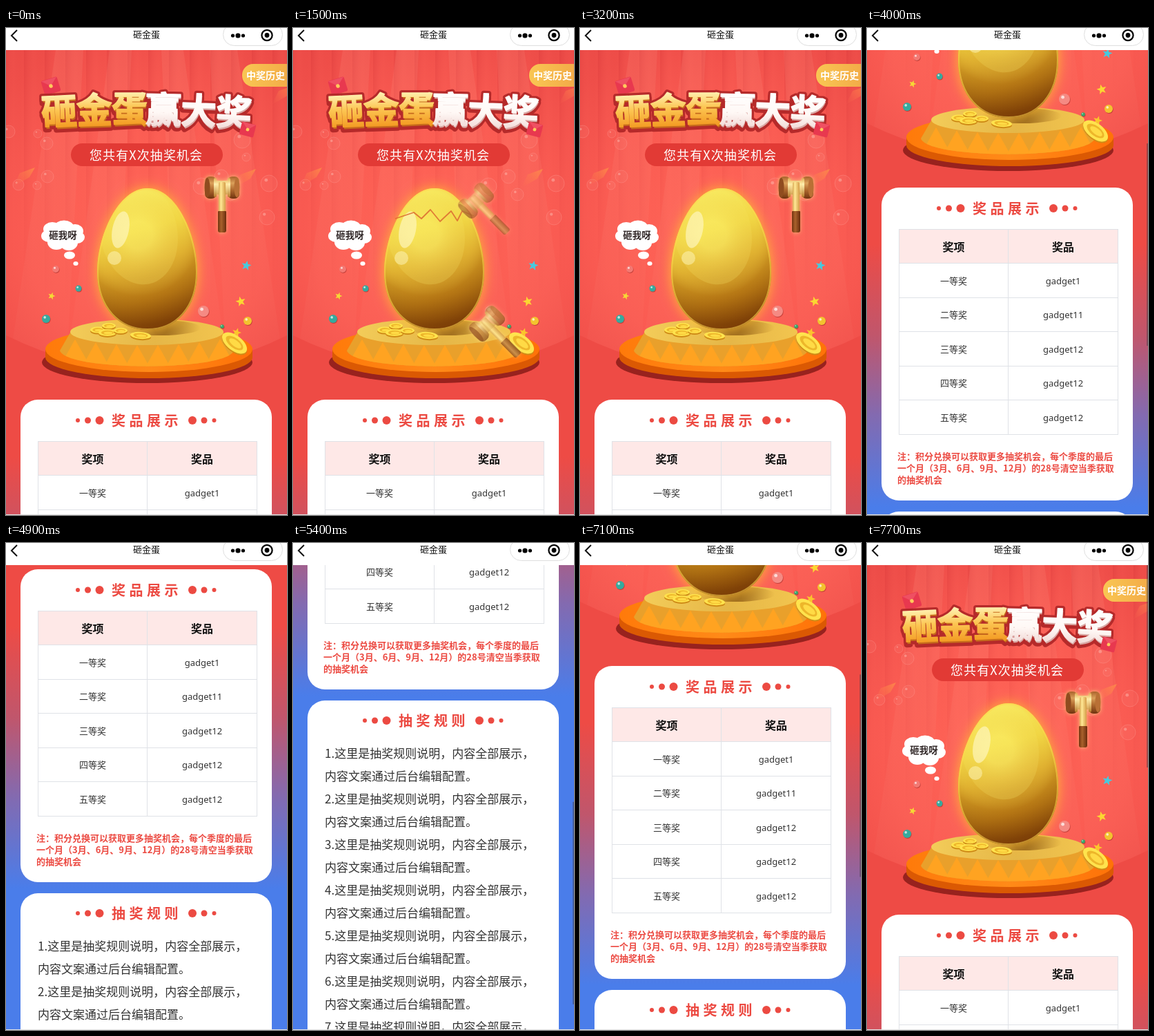
Animation of 407 by 705 pixels, one loop 8000 ms. Source, as an HTML page with a canvas:

```html
<!DOCTYPE html>
<html lang="zh">
<head>
<meta charset="utf-8">
<style>
html, body { margin: 0; width: 100%; height: 100%; overflow: hidden; background: #fff; }
canvas { display: block; width: 407px; height: 705px; }
</style>
</head>
<body>
<canvas id="stage"></canvas>
<script>
const W = 407, H = 705, LOOP = 8000, TOP = 32, TAU = Math.PI * 2;
const FONT = '"Noto Sans CJK SC", "Noto Sans CJK", sans-serif';
const RED = '#ec4a42';
const canvas = document.getElementById('stage');
const ctx = canvas.getContext('2d');
const dpr = window.devicePixelRatio || 1;
canvas.width = W * dpr;
canvas.height = H * dpr;

const clamp = v => Math.max(0, Math.min(1, v));
const ramp = (t, a, b) => clamp((t - a) / (b - a));
const glide = p => 0.45 * p + 0.55 * Math.sin(p * Math.PI / 2);

function gradient(x0, y0, x1, y1, ...stops) {
  const g = ctx.createLinearGradient(x0, y0, x1, y1);
  stops.forEach(([at, color]) => g.addColorStop(at, color));
  return g;
}
function radial(x, y, r0, r1, ...stops) {
  const g = ctx.createRadialGradient(x, y, r0, x, y, r1);
  stops.forEach(([at, color]) => g.addColorStop(at, color));
  return g;
}
function oval(x, y, rx, ry, fill, angle = 0) {
  ctx.beginPath();
  ctx.ellipse(x, y, rx, ry, angle, 0, TAU);
  ctx.fillStyle = fill;
  ctx.fill();
}
const dot = (x, y, r, fill) => oval(x, y, r, r, fill);
function round(x, y, w, h, r, fill) {
  ctx.beginPath();
  ctx.roundRect(x, y, w, h, r);
  ctx.fillStyle = fill;
  ctx.fill();
}
function poly(points, fill) {
  ctx.beginPath();
  points.forEach(([x, y]) => ctx.lineTo(x, y));
  ctx.closePath();
  ctx.fillStyle = fill;
  ctx.fill();
}
// y is the visual middle of the line
function text(str, x, y, size, color, { weight = 400, align = 'left', spacing = 0, font = FONT } = {}) {
  ctx.font = `${weight} ${size}px ${font}`;
  ctx.textAlign = align;
  ctx.letterSpacing = spacing + 'px';
  ctx.fillStyle = color;
  ctx.fillText(str, x, y + size * 0.37);
  ctx.letterSpacing = '0px';
}
function layer(alpha, draw) {
  if (alpha <= 0) return;
  ctx.save();
  ctx.globalAlpha *= alpha;
  draw();
  ctx.restore();
}

function drawBackdrop() {
  ctx.fillStyle = gradient(0, 620, 0, 1000, [0, '#ee4b45'], [0.35, '#c0566c'], [0.65, '#836ab0'], [1, '#4a7dea']);
  ctx.fillRect(0, 0, W, 1600);
  ctx.save();
  ctx.beginPath();
  ctx.moveTo(0, 0);
  ctx.lineTo(W, 0);
  ctx.lineTo(W, 445);
  ctx.quadraticCurveTo(204, 545, 0, 445);
  ctx.clip();
  ctx.fillStyle = radial(204, 290, 30, 330, [0, '#ff6557'], [0.5, '#fa5b52'], [0.85, '#ef4e49'], [1, '#ec4b47']);
  ctx.fillRect(0, 0, W, 560);
  // curtain folds, fading out downwards
  for (let y = 32; y < 400; y += 8) layer(1 - (y - 32) / 368, () => {
    for (let x = -4; x < W; x += 30) {
      ctx.fillStyle = gradient(x, 0, x + 30, 0, [0, 'rgba(190,30,40,.17)'], [0.5, 'rgba(255,110,100,.06)'], [1, 'rgba(190,30,40,0)']);
      ctx.fillRect(x, y, 30, 8);
    }
  });
  for (const [a, b, c, d] of [[72, 112, 5, 88], [150, 182, 88, 160], [225, 257, 247, 320], [295, 335, 319, 402]])
    poly([[a, 32], [b, 32], [d, 485], [c, 485]], gradient(0, 32, 0, 485, [0, 'rgba(255,170,150,.13)'], [1, 'rgba(255,170,150,.03)']));
  ctx.restore();
}

function drawBubbles() {
  ctx.lineWidth = 1;
  for (const [x, y, r] of [[4, 150, 9], [46, 153, 6], [59, 167, 9], [60, 215, 9], [45, 228, 6], [18, 227, 8], [342, 162, 12], [348, 187, 6], [381, 225, 12], [378, 274, 11], [283, 229, 12], [325, 241, 9], [312, 215, 10]]) {
    dot(x, y, r, 'rgba(255,150,140,.12)');
    ctx.strokeStyle = 'rgba(255,175,165,.27)';
    ctx.stroke();
    dot(x - r * 0.35, y - r * 0.4, r * 0.2, 'rgba(255,220,210,.35)');
  }
  for (const [x, y] of [[27, 213], [347, 215], [402, 94]])
    poly([[x - 17, y + 17], [x - 7, y - 3], [x + 15, y - 11], [x + 7, y + 3]],
      gradient(x - 15, y + 14, x + 12, y - 10, [0, 'rgba(255,115,80,.05)'], [1, 'rgba(255,150,70,.65)']));
}

function packet(x, y, angle, s) {
  ctx.save();
  ctx.translate(x, y);
  ctx.rotate(angle);
  ctx.scale(s, s);
  round(-10.5, -9.5, 21, 19, 2, '#e8384f');
  poly([[-10, -9], [10, -9], [0, 0]], '#ef5062');
  dot(0, 0, 2.4, '#ffc95c');
  ctx.restore();
}

function drawBanner() {
  packet(65, 84, -0.3, 1.15);
  const chars = [['砸', 77, 121, -0.05], ['金', 128, 119, -0.03], ['蛋', 179, 117, -0.01], ['赢', 228, 118, 0.02], ['大', 279, 120, 0.04], ['奖', 330, 122, 0.06]];
  const each = paint => chars.forEach(([c, x, y, a], i) => {
    ctx.save();
    ctx.translate(x, y);
    ctx.rotate(a);
    paint(c, i);
    ctx.restore();
  });
  ctx.lineJoin = 'round';
  ctx.textAlign = 'center';
  ctx.font = `900 52px ${FONT}`;
  each(c => {
    ctx.strokeStyle = '#b52a2a';
    ctx.lineWidth = 8;
    ctx.strokeText(c, 0, 23);
    ctx.strokeText(c, 0, 19);
  });
  each((c, i) => {
    ctx.fillStyle = i < 3 ? '#c66a1c' : '#d9a7a3';
    ctx.fillText(c, 1, 22);
    ctx.fillStyle = ctx.strokeStyle = i < 3
      ? gradient(0, -24, 0, 24, [0, '#fff0ae'], [0.45, '#fcc653'], [1, '#f39a22'])
      : gradient(0, -24, 0, 24, [0, '#ffffff'], [0.6, '#fff8f5'], [1, '#f2dcd9']);
    ctx.lineWidth = 1.6;
    ctx.strokeText(c, 0, 19);
    ctx.fillText(c, 0, 19);
  });
  packet(350, 147, 0.25, 1);
  round(94, 167, 220, 33, 16.5, '#e23a35');
  text('您共有X次抽奖机会', 121, 184, 18, '#fff', { spacing: 1.1 });
  round(342, 52, 70, 33, [16, 0, 0, 16], gradient(342, 0, 407, 0, [0, '#f9c653'], [1, '#f3ac48']));
  text('中奖历史', 348, 69, 14, '#fff', { weight: 700 });
}

function star(x, y, r, color, turn) {
  const points = Array.from({ length: 10 }, (_, i) => {
    const d = i % 2 ? r * 0.42 : r, a = turn + i * TAU / 10;
    return [x + d * Math.sin(a), y - d * Math.cos(a)];
  });
  poly(points, color);
}
function ball(x, y, r, color) {
  dot(x + 0.7, y + 1, r, 'rgba(130,25,25,.45)');
  dot(x, y, r, color);
  dot(x - r * 0.3, y - r * 0.35, r * 0.3, 'rgba(255,255,255,.7)');
}

function drawConfetti() {
  ball(72, 349, 5, '#f37973');
  ball(105, 377, 4.5, '#36aa9e');
  ball(58, 421, 6, '#36aa9e');
  ball(286, 410, 8, '#f58a83');
  ball(350, 424, 6, '#f3c22f');
  ball(313, 432, 2.8, '#36a86a');
  star(348, 344, 7.5, '#47c9de', 0.2);
  star(340, 396, 7.5, '#fbd732', -0.25);
  star(66, 388, 5.5, '#f6d935', 0.3);
  star(334, 441, 7, '#fbc52c', 0.3);
  for (const [x, y, rx, ry] of [[67, 291, 13, 10], [84, 288, 14, 9.5], [100, 294, 12, 10], [62, 301, 11, 9], [103, 303, 11, 9], [73, 310, 13, 11], [91, 311, 13, 11], [83, 300, 24, 15], [92, 329, 8, 5.5], [101, 341, 3.6, 3]])
    oval(x, y, rx, ry, '#fff');
  text('砸我呀', 82.5, 300, 13.5, '#332a2a', { weight: 700, align: 'center' });
}

function coin(x, y, rx, ry, angle = 0) {
  oval(x, y + 2, rx, ry, '#cf8b16', angle);
  oval(x, y, rx, ry, '#ffe34d', angle);
  oval(x, y, rx * 0.7, ry * 0.65, '#edb62a', angle);
  oval(x + 1, y + 0.5, rx * 0.5, ry * 0.4, '#ffda45', angle);
}

function drawPlatform() {
  oval(204.5, 484, 152.5, 30, '#98221e');
  oval(207, 477, 150, 30, '#db5903');
  ctx.fillStyle = '#db5903';
  ctx.fillRect(57, 465, 300, 12);
  oval(207, 465, 150, 33, gradient(57, 0, 357, 0, [0, '#ff7a0a'], [0.5, '#ff8a18'], [1, '#ff7208']));
  const body = new Path2D('M93 441 L78 467 C88 497 320 497 330 467 L315 441 Z');
  ctx.save();
  ctx.fillStyle = '#e9a02b';
  ctx.fill(body);
  ctx.clip(body);
  for (let i = 0; i < 8; i++) {
    const x = 100 + i * 30, lift = 20 * Math.sqrt(Math.max(0, 1 - ((x - 204) / 128) ** 2));
    poly([[x - 18, 471 + lift], [x, 439 + lift], [x + 18, 471 + lift]], '#ffa321');
  }
  ctx.restore();
  oval(204, 440, 111, 19, gradient(93, 0, 315, 0, [0, '#f3cc59'], [0.55, '#e5b647'], [1, '#f2c54f']));
  oval(224, 434, 58, 11, radial(224, 434, 10, 58, [0, 'rgba(110,60,5,.65)'], [1, 'rgba(150,90,10,0)']));
}

function drawCoins() {
  coin(133, 437, 11, 4.5);
  coin(149, 431, 10, 4);
  coin(147, 441, 13, 5);
  coin(166, 438, 10, 4);
  coin(195, 445, 15, 5, 0.08);
  coin(331, 456, 21, 11, 0.65);
}

const eggShape = new Path2D('M205 232 C248 232 277 302 277 353 C277 405 246 437 205 437 C164 437 132 405 132 353 C132 302 162 232 205 232 Z');
const crack = [[148, 276], [175, 267], [186, 276], [199, 263], [213, 280], [229, 265], [238, 279], [245, 265], [262, 272]];

function fillEgg() {
  ctx.save();
  ctx.clip(eggShape);
  ctx.fillStyle = gradient(182, 235, 240, 438, [0, '#f9ec62'], [0.28, '#f1d744'], [0.5, '#e0b130'], [0.75, '#bd811b'], [1, '#86450a']);
  ctx.fillRect(130, 230, 150, 210);
  ctx.fillStyle = radial(192, 300, 20, 130, [0, 'rgba(255,244,110,.4)'], [0.4, 'rgba(235,190,60,.05)'], [0.62, 'rgba(165,95,5,.3)'], [1, 'rgba(105,45,0,.5)']);
  ctx.fillRect(130, 230, 150, 210);
  oval(192, 296, 56, 76, gradient(170, 230, 200, 372, [0, 'rgba(255,250,130,0)'], [1, 'rgba(255,245,120,.2)']), -0.2);
  oval(166, 292, 12, 27, 'rgba(255,248,195,.65)', 0.2);
  dot(157, 333, 10, 'rgba(255,247,190,.5)');
  // lit rim
  ctx.strokeStyle = 'rgba(255,215,80,.55)';
  ctx.lineWidth = 4;
  ctx.stroke(eggShape);
  ctx.restore();
}
function drawEgg() {
  ctx.save();
  ctx.shadowColor = 'rgba(255,190,50,.9)';
  ctx.shadowBlur = 18 * dpr;
  ctx.fillStyle = '#e4b02f';
  ctx.fill(eggShape);
  ctx.restore();
  fillEgg();
}
function drawCrack() {
  ctx.beginPath();
  crack.forEach(([x, y]) => ctx.lineTo(x, y));
  ctx.strokeStyle = 'rgba(222,112,50,.9)';
  ctx.lineWidth = 1.8;
  ctx.lineJoin = 'round';
  ctx.stroke();
}
function eggPart(edgeY, dy) {
  ctx.save();
  ctx.translate(0, dy);
  ctx.beginPath();
  [[100, 276], ...crack, [300, 272], [300, edgeY], [100, edgeY]].forEach(([x, y]) => ctx.lineTo(x, y));
  ctx.clip();
  drawEgg();
  ctx.restore();
}
function drawBroken() {
  oval(205, 269, 52, 13, '#fff1a0');
  eggPart(460, 0);
  eggPart(200, -33);
}

function hammer(x, y, angle) {
  ctx.save();
  ctx.translate(x, y);
  ctx.rotate(angle);
  const wood = gradient(0, -16, 0, 16, [0, '#a9622b'], [0.3, '#dba05a'], [0.6, '#b06a2f'], [1, '#70330f']);
  const gold = gradient(-8, 0, 8, 0, [0, '#b8741f'], [0.4, '#ffe794'], [1, '#c07a24']);
  const band = gradient(0, -16, 0, 16, [0, '#d99a3a'], [0.35, '#fff0b0'], [1, '#b26f1e']);
  ctx.shadowColor = 'rgba(255,215,130,.85)';
  ctx.shadowBlur = 6 * dpr;
  round(-5, 8, 10, 57, 3, gold);
  round(-12, -10, 24, 20, 2, band);
  for (const side of [-1, 1]) round(side * 16.5 - 8.5, -16, 17, 32, 7, wood);
  ctx.shadowBlur = 0;
  round(-6, 34, 12, 31, [1, 1, 3, 3], gradient(-6, 0, 6, 0, [0, '#71330f'], [0.4, '#a9622c'], [1, '#692c0d']));
  round(-5, -8, 10, 40, 2, gold);
  for (const side of [-1, 1]) {
    round(side * 10 - 2, -14, 4, 28, 2, band);
    oval(side * 21.5, 0, 4, 14, side < 0 ? '#8f4c1f' : '#b97035');
  }
  ctx.restore();
}

function drawScene(t) {
  const playing = t >= 900 && t < 3200;
  const lift = playing ? ramp(t, 800, 1200) : 0;
  const strike = playing ? ramp(t, 1200, 1700) : 0;
  const burst = playing ? ramp(t, 1700, 2000) : 0;
  drawPlatform();
  layer(1 - burst, () => {
    drawEgg();
    layer(lift, drawCrack);
  });
  layer(burst, drawBroken);
  drawCoins();
  layer(1 - lift, () => hammer(313, 231, 0));
  layer(lift * (1 - strike), () => hammer(265, 250, -0.78));
  layer(strike * (1 - burst), () => hammer(281, 428, -0.78));
}

function heading(str, y) {
  [[104, 3], [118.5, 4.5], [135.5, 6]].forEach(([x, r]) => {
    dot(x, y - 1, r, RED);
    dot(405.5 - x, y - 1, r, RED);
  });
  text(str, 153, y, 20, RED, { weight: 700, spacing: 5.5 });
}

function drawPrizes() {
  round(21, 538, 364, 453, 25, '#fff');
  heading('奖品展示', 569);
  const rowY = i => 598 + i * 49.5;
  ctx.fillStyle = '#fee8e7';
  ctx.fillRect(46, 598, 318, 49);
  ctx.fillStyle = '#dfe2e7';
  for (let i = 0; i < 7; i++) ctx.fillRect(46, Math.floor(rowY(i)), 318, 1);
  for (const x of [46, 204, 363]) ctx.fillRect(x, 598, 1, 298);
  const head = { weight: 700, align: 'center' };
  text('奖项', 125.5, 624, 16, '#111', head);
  text('奖品', 284, 624, 16, '#111', head);
  ['一', '二', '三', '四', '五'].forEach((n, i) => {
    const y = rowY(i + 1) + 25.5;
    text(n + '等奖', 125.5, y, 13, '#333', { align: 'center' });
    text('gadget' + (['1', '11'][i] || '12'), 284, y, 13, '#333', { align: 'center', font: '"Noto Sans", sans-serif' });
  });
  ['注：积分兑换可以获取更多抽奖机会，每个季度的最后', '一个月（3月、6月、9月、12月）的28号清空当季获取', '的抽奖机会']
    .forEach((line, i) => text(line, 44, 927 + i * 17, 13, RED, { weight: 700 }));
}

function drawRules() {
  round(21, 1007, 364, 535, 25, '#fff');
  heading('抽奖规则', 1037);
  for (let i = 0; i < 7; i++) {
    const y = 1084 + i * 66;
    text(`${i + 1}.这里是抽奖规则说明，内容全部展示，`, 46, y, 17, '#333');
    text('内容文案通过后台编辑配置。', 46, y + 33, 17, '#333');
  }
}

function drawHeader() {
  ctx.fillStyle = '#fff';
  ctx.fillRect(0, 0, W, TOP);
  ctx.beginPath();
  ctx.moveTo(16, 3);
  ctx.lineTo(8, 11);
  ctx.lineTo(16, 19);
  ctx.strokeStyle = '#111';
  ctx.lineWidth = 2;
  ctx.lineJoin = 'miter';
  ctx.stroke();
  text('砸金蛋', 203.5, 9.5, 13, '#111', { align: 'center' });
  ctx.beginPath();
  ctx.roundRect(314.5, -6.5, 86, 32, 16);
  ctx.strokeStyle = '#dedede';
  ctx.lineWidth = 1;
  ctx.stroke();
  dot(328.5, 11, 2.6, '#000');
  dot(336, 11, 3.6, '#000');
  dot(343.5, 11, 2.6, '#000');
  ctx.beginPath();
  ctx.arc(378, 10.5, 7.6, 0, TAU);
  ctx.strokeStyle = '#000';
  ctx.lineWidth = 2.2;
  ctx.stroke();
  dot(378, 10.5, 3.4, '#000');
}

const scrolls = [[3600, 4400, 500], [5000, 5600, 360], [6500, 7100, -500], [7300, 7700, -360]];
const scrollAt = t => scrolls.reduce((sum, [a, b, d]) => sum + d * glide(ramp(t, a, b)), 0);

function drawScrollbar(t, scroll) {
  const run = scrolls.filter(([a]) => t > a).pop();
  if (!run) return;
  layer(1 - ramp(t, run[1] + 200, run[1] + 500), () => {
    ctx.fillStyle = 'rgba(60,60,70,.45)';
    ctx.fillRect(405, TOP + scroll * 0.44, 2, 293);
  });
}

function render(t) {
  const scroll = Math.round(scrollAt(t));
  ctx.setTransform(dpr, 0, 0, dpr, 0, 0);
  ctx.fillStyle = '#e4e4e4';
  ctx.fillRect(0, 0, W, H);
  ctx.save();
  ctx.beginPath();
  ctx.rect(0, TOP, W, 672);
  ctx.clip();
  ctx.save();
  ctx.translate(0, -scroll);
  drawBackdrop();
  drawBubbles();
  drawBanner();
  drawConfetti();
  drawScene(t);
  drawPrizes();
  drawRules();
  ctx.restore();
  if (t >= 2300 && t < 3200) {
    ctx.fillStyle = 'rgba(0,0,0,.5)';
    ctx.fillRect(0, TOP, W, 672);
  }
  drawScrollbar(t, scroll);
  ctx.restore();
  drawHeader();
}

// The motion advances ten times a second
function tick() {
  render(Math.floor(performance.now() % LOOP / 100) * 100);
  requestAnimationFrame(tick);
}
tick();
</script>
</body>
</html>
```
